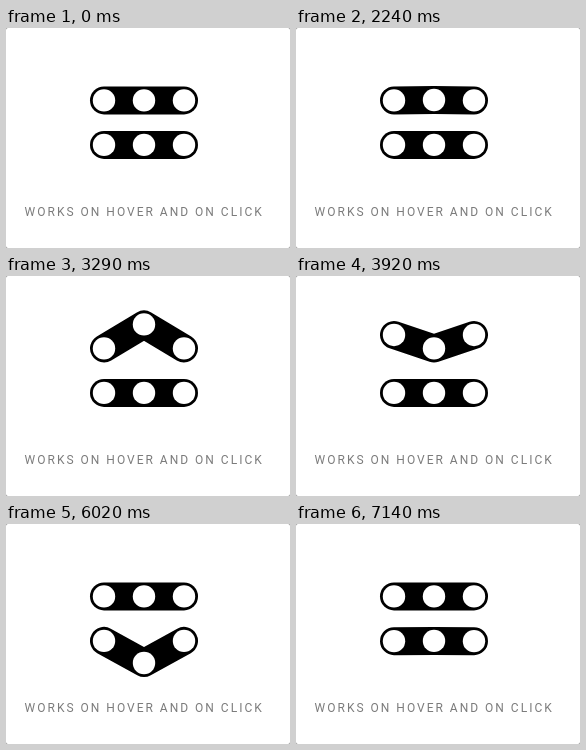
An HTML page for the animation above (7630 ms loop, 284 by 220 pixels).

```html
<!DOCTYPE html>
<html>
<head>
<meta charset="utf-8">
<style>
  html, body { margin: 0; width: 100%; height: 100%; overflow: hidden; background: #888; }
  svg { display: block; width: 284px; height: 220px; background: #fff; border-radius: 2px; }
  polyline { fill: none; stroke: #000; stroke-width: 28; stroke-linecap: round; stroke-linejoin: round; }
  circle { fill: #fff; }
  text { font: 12px Roboto, sans-serif; letter-spacing: 2px; fill: #7c7c7c; }
</style>
</head>
<body>
<svg viewBox="0 0 284 220">
  <g id="up"><polyline/><circle r="11.2"/><circle r="11.2"/><circle r="11.2"/></g>
  <g id="down"><polyline/><circle r="11.2"/><circle r="11.2"/><circle r="11.2"/></g>
  <text x="18.6" y="188">WORKS ON HOVER AND ON CLICK</text>
</svg>
<script>
const LOOP = 7630, SETTLE = 700, PERIOD = 240, FRAME = 70;
const JOINTS = [98, 138, 178];

// Each move springs the bend: hover, press, release.
const buttons = [
  { id: 'up', y: 72.4, dir: -1, moves: [[2230, 0, 6], [3203, 6, 18], [3790, 21, 0]] },
  { id: 'down', y: 116.9, dir: 1, moves: [[4750, 0, 6], [5943, 6, 18], [6590, 21, 0]] }
].map(button => {
  const group = document.getElementById(button.id);
  return { ...button, line: group.querySelector('polyline'), dots: group.querySelectorAll('circle') };
});

function bendAt(moves, time) {
  const move = moves.filter(([start]) => start <= time).pop();
  if (!move) return 0;
  const [start, from, to] = move;
  const elapsed = time - start;
  const decay = Math.max(0, 1 - elapsed / SETTLE) ** 2;
  return to + (from - to) * decay * Math.cos(2 * Math.PI * elapsed / PERIOD);
}

// A positive bend pushes the middle outwards, a negative one the ends.
function drawButton({ y, dir, moves, line, dots }, time) {
  const bend = bendAt(moves, time);
  const middle = y + dir * Math.max(0, bend);
  const ends = y + dir * Math.max(0, -bend);
  const points = JOINTS.map((x, i) => [x, i === 1 ? middle : ends]);
  line.setAttribute('points', points.join(' '));
  points.forEach(([x, cy], i) => {
    dots[i].setAttribute('cx', x);
    dots[i].setAttribute('cy', cy);
  });
}

function render() {
  const time = Math.floor(performance.now() % LOOP / FRAME) * FRAME;
  buttons.forEach(button => drawButton(button, time));
  requestAnimationFrame(render);
}
render();
</script>
</body>
</html>
```
